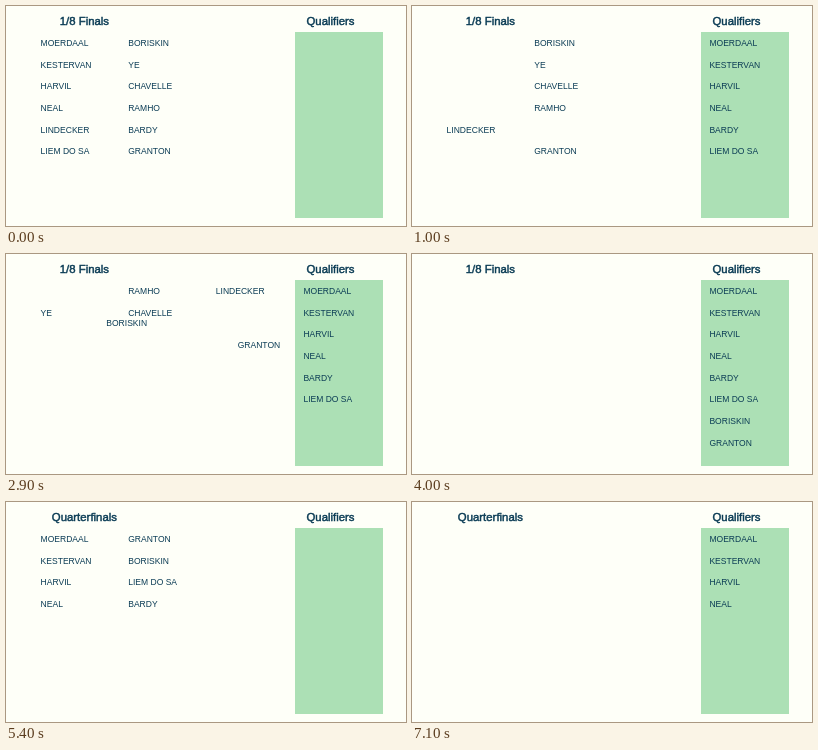
Write an HTML page that moves like this. It is 400 px wide and 220 px high and loops after 8 s.

```html
<!DOCTYPE html>
<html lang="en">
<head>
<meta charset="utf-8">
<style>
  html, body { margin: 0; width: 100%; height: 100%; overflow: hidden; background: #fefff8; }
  svg { display: block; width: 400px; height: 220px; }
  text { font: 8.54px "Liberation Sans", Arial, sans-serif; fill: #0b3c55; }
  .head { font-size: 11.38px; text-anchor: middle; stroke: #0b3c55; stroke-width: .45px; }
</style>
</head>
<body>
<svg viewBox="0 0 400 220">
  <rect x="289" y="26" width="88" height="186" fill="#ace0b5"/>
  <text class="head" id="round" x="78.4" y="19"></text>
  <text class="head" x="324.5" y="19">Qualifiers</text>
</svg>
<script>
const LOOP = 8000, STEP = 100, STEPS = 4;
const starts = [0, 700, 1800, 2900, 4000, 5100, 6100, 7100];
const DRAW = 5; // the move where riders swap labels halfway

// One slot per stage as column and row; a missing slot means eliminated.
const riders = {
  MOERDAAL: "00 30 30 30 30 00 30 30",
  KESTERVAN: "01 31 31 31 31 01 31 31",
  HARVIL: "02 32 32 32 32 02 32 32",
  NEAL: "03 33 33 33 33 03 33 33",
  BARDY: "14 34 34 34 34 13 13",
  "LIEM DO SA": "05 35 35 35 35 12 12",
  BORISKIN: "10 10 00 36 36 11 11",
  GRANTON: "15 15 21 37 37 10 10",
  LINDECKER: "04 04 20 20",
  RAMHO: "13 13 10 10",
  CHAVELLE: "12 12 11 11",
  YE: "11 11 01 01"
};

// During the draw, each key hands its path over to its value.
const heirs = {
  HARVIL: "BARDY", BORISKIN: "KESTERVAN", MOERDAAL: "NEAL",
  BARDY: "LIEM DO SA", KESTERVAN: "GRANTON"
};
const givers = Object.fromEntries(Object.entries(heirs).map(([a, b]) => [b, a]));

const svg = document.querySelector("svg");
const round = document.getElementById("round");
const labels = {};
for (const name in riders) {
  riders[name] = riders[name].split(" ");
  const label = document.createElementNS(svg.namespaceURI, "text");
  label.textContent = name;
  labels[name] = svg.appendChild(label);
}

const slotAt = (name, stage) => riders[name][stage];
const mix = (a, b, p) => a + (b - a) * p;

function ends(name, stage, p) {
  let from = slotAt(name, Math.max(stage - 1, 0));
  let to = slotAt(name, stage);
  if (stage === DRAW && to) {
    if (p < 0.5) to = heirs[name] ? slotAt(heirs[name], stage) : from;
    else from = givers[name] ? slotAt(givers[name], stage - 1) : to;
  }
  return [from, to];
}

function draw(t) {
  const stage = starts.findLastIndex(s => t >= s);
  const p = Math.min(1, (Math.floor((t - starts[stage]) / STEP) + 1) / STEPS);
  const drawn = stage > DRAW || (stage === DRAW && p >= 0.5);
  round.textContent = drawn ? "Quarterfinals" : "1/8 Finals";
  for (const name in labels) {
    const [from, to] = ends(name, stage, p);
    const label = labels[name];
    label.style.display = to ? "" : "none";
    if (!to) continue;
    label.setAttribute("x", 34.6 + 87.6 * mix(+from[0], +to[0], p));
    label.setAttribute("y", 40 + 21.65 * mix(+from[1], +to[1], p));
  }
}

const begin = performance.now();
function tick() {
  draw((performance.now() - begin) % LOOP);
  requestAnimationFrame(tick);
}
tick();
</script>
</body>
</html>
```
